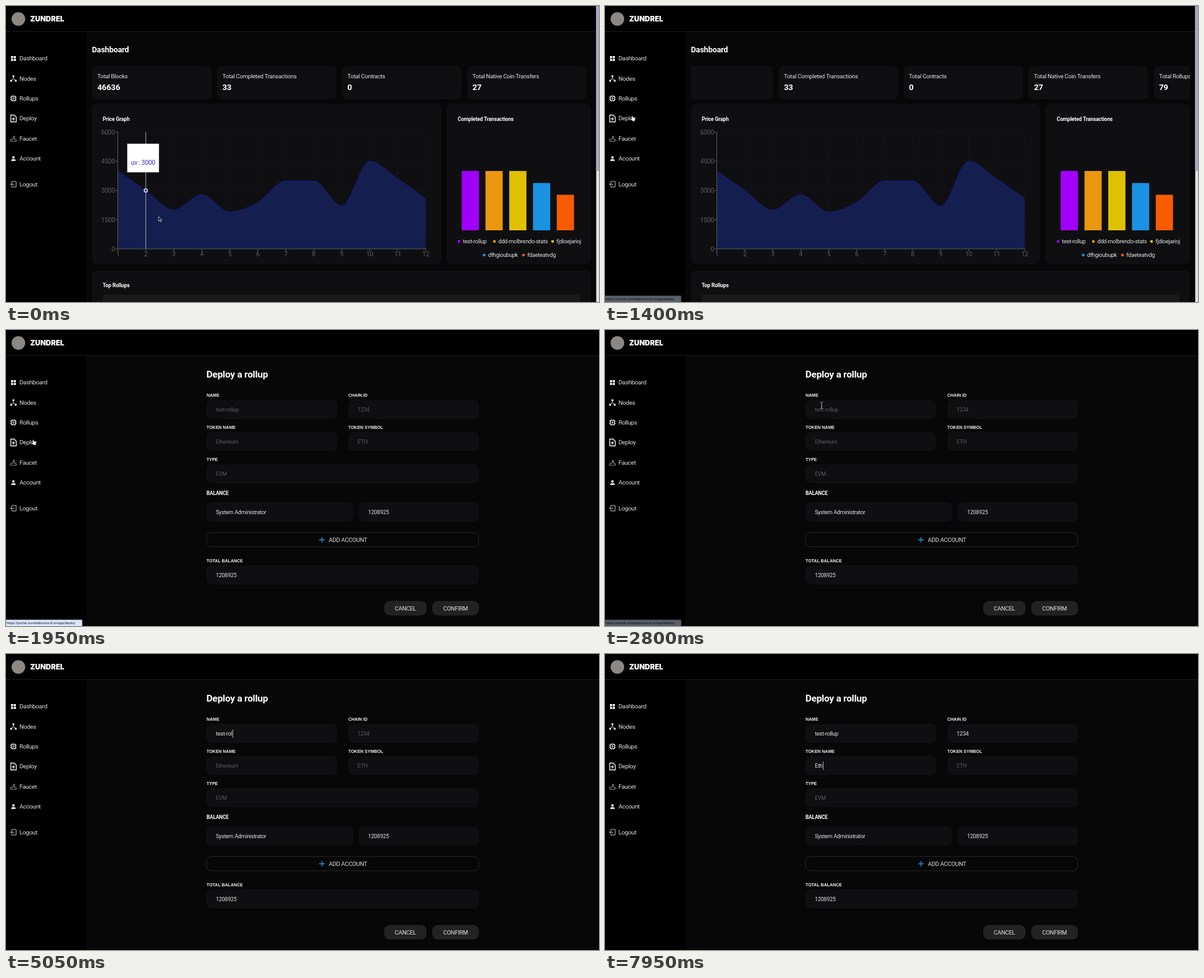
Write an HTML page that moves like this. It is 958 px wide and 479 px high and loops after 8 s.

```html
<!DOCTYPE html>
<html lang="en">
<head>
<meta charset="utf-8">
<title>Rollup dashboard</title>
<style>
html, body { margin: 0; width: 100%; height: 100%; overflow: hidden; background: #000; }
svg { display: block; width: 100%; height: 100%; }
text { font-family: Roboto, "Open Sans", sans-serif; letter-spacing: -.03em; fill: #e2e2e2; white-space: pre; }
.bold { font-weight: 700; fill: #fff; letter-spacing: -.015em; }
.label { font: 700 7px "Liberation Sans", Arial, sans-serif; letter-spacing: 0; fill: #f2f2f2; }
.brand { font: 900 11.6px Inter, sans-serif; letter-spacing: 0; fill: #fff; }
.url { font: 5.9px "Liberation Sans", Arial, sans-serif; letter-spacing: 0; fill: #1d2230; }
.axis { fill: #5c5c5e; }
.hint { fill: #57575a; }
.icon { fill: none; stroke: #f0f0f0; }
.solid { fill: #f0f0f0; stroke: none; }
</style>
</head>
<body>
<svg id="stage" viewBox="0 0 958 479" preserveAspectRatio="none"></svg>
<script>
const DURATION = 8000;
const PANEL = '#0f0f11';
const stage = document.getElementById('stage');

const text = (x, y, str, size, attrs = '') => `<text x="${x}" y="${y}" font-size="${size}" ${attrs}>${str}</text>`;
const bold = (x, y, str, size) => text(x, y, str, size, 'class="bold"');
const rect = (x, y, w, h, fill, rx = 0, attrs = '') =>
  `<rect x="${x}" y="${y}" width="${w}" height="${h}" rx="${rx}" fill="${fill}" ${attrs}/>`;
const line = (x1, y1, x2, y2, stroke, attrs = '') =>
  `<path d="M${x1} ${y1}L${x2} ${y2}" stroke="${stroke}" ${attrs}/>`;
const range = n => [...Array(n).keys()];

// Header and side menu
const menu = [
  ['Dashboard', 85, '<path class="solid" d="M-4-4h3.5v3.5h-3.5zM.5-4H4v3.5H.5zM-4 .5h3.5V4h-3.5zM.5.5H4V4H.5z"/>'],
  ['Nodes', 117.3, '<path class="icon" d="M0-3V0L-4 4M0 0L4 4"/><circle class="solid" cy="-3.7" r="1.7"/><circle class="solid" cx="-3.7" cy="3.7" r="1.7"/><circle class="solid" cx="3.7" cy="3.7" r="1.7"/>'],
  ['Rollups', 149.6, '<rect class="icon" x="-3.5" y="-3.5" width="7" height="7" rx="1.5" stroke-width="1.4"/><path class="icon" d="M-2-5V-3M2-5V-3M-2 5V3M2 5V3M-5-2H-3M-5 2H-3M5-2H3M5 2H3"/><circle class="icon" r="1.3"/>'],
  ['Deploy', 182, '<path class="icon" d="M-4.3-5.5H1.2L4.6-2V5.5H-4.3z" stroke-width="1.3"/><path class="icon" d="M0-1.8V3.2M-2.5.7H2.5" stroke-width="1.3"/>'],
  ['Faucet', 214.5, '<path class="icon" d="M-4.5 4.5V1.5H-1L-1-1H2V1.5H4.5V4.5zM-1-3.5H3M1-3.5V-1" stroke-width=".6"/>'],
  ['Account', 247, '<circle class="solid" cy="-2" r="2"/><path class="solid" d="M-3.6 3.8V2.6C-3.6.2 3.6.2 3.6 2.6V3.8z"/>'],
  ['Logout', 288.4, '<path class="icon" d="M-2.5-2V-4.5H4.3V4.5H-2.5V2M1.5 0H-4.5M-2.5-2L-4.5 0L-2.5 2" stroke-width=".8"/>']
];
const shell = rect(0, 0, 958, 479, '#070707') + rect(0, 0, 130, 479, '#000') + rect(0, 0, 958, 41, '#000') +
  rect(0, 41, 958, 1, '#1b1b1b') +
  '<circle cx="20" cy="21" r="11" fill="#8b8884"/>' +
  text(39, 25.2, 'ZUNDREL', 11.6, 'class="brand"') +
  menu.map(([name, y, icon]) =>
    `<g transform="translate(12 ${y})" stroke-width="1">${icon}</g>` + text(21.7, y + 3.4, name, 9.85)).join('');

// Area chart with a monotone cubic curve
const prices = [4000, 3000, 2000, 2780, 1890, 2390, 3490, 3490, 2200, 4500, 3600, 2580];
const STEP = 45.2;
const chartX = i => 180.7 + i * STEP;
const chartY = v => 393 - v * 189 / 6000;
const heights = prices.map(chartY);
const deltas = heights.slice(1).map((y, i) => y - heights[i]);
const inner = heights.map((_, i) => {
  const a = deltas[i - 1], b = deltas[i];
  return a * b > 0 ? Math.sign(a) * Math.min(Math.abs(a), Math.abs(b), Math.abs(a + b) / 4) * 2 : 0;
});
const last = prices.length - 1;
inner[0] = (3 * deltas[0] - inner[1]) / 2;
inner[last] = (3 * deltas[last - 1] - inner[last - 1]) / 2;
const curve = `M${chartX(0)} ${heights[0]}` + deltas.map((_, i) =>
  `C${chartX(i) + STEP / 3} ${heights[i] + inner[i] / 3} ${chartX(i + 1) - STEP / 3} ${heights[i + 1] - inner[i + 1] / 3} ${chartX(i + 1)} ${heights[i + 1]}`).join('');

const levels = range(5).map(i => i * 1500);
const priceChart = rect(139, 158, 564, 260, PANEL, 8) + bold(156.3, 186, 'Price Graph', 8.5) +
  levels.map(v => line(181, chartY(v), 678, chartY(v), '#19191b', 'stroke-dasharray="3 3"')).join('') +
  range(12).map(i => line(chartX(i), 204, chartX(i), 393, '#19191b', 'stroke-dasharray="3 3"')).join('') +
  `<path d="${curve}V393H${chartX(0)}z" fill="#141f4f"/><path d="${curve}" fill="none" stroke="#17178c" stroke-width="1"/>` +
  line(180.5, 204, 180.5, 393, '#58585a') + line(180.5, 393, 678, 393, '#58585a') +
  levels.map(v => line(176.5, chartY(v), 180.5, chartY(v), '#58585a') +
    text(176, chartY(v) + 3.8, v, 10.5, 'class="axis" text-anchor="end"')).join('') +
  range(12).map(i => line(chartX(i), 393, chartX(i), 397, '#58585a') +
    text(chartX(i), 405, i + 1, 10.3, 'class="axis" text-anchor="middle"')).join('');

const tooltip = '<g id="tooltip">' + line(225.8, 204, 225.8, 393, '#a8a8aa') +
  '<circle cx="225.8" cy="298.5" r="2.6" fill="#1d1da8" stroke="#fff" stroke-width="1.3"/>' +
  rect(196, 223, 51, 46, '#fff', 0, 'stroke="#ccc" stroke-width=".5"') +
  text(202, 257, 'uv : 3000', 10.4, 'style="fill:#3a2ec2"') + '</g>';

// Bar chart
const bars = [['#a100ff', 96], ['#eb970f', 96], ['#dfc100', 96], ['#1a93e2', 76.5], ['#f95c00', 57.5]];
const legend = [['test-rollup', 732, 381], ['ddd-molbrendo-stats', 789, 381], ['fjdioejarioj', 883, 381],
  ['dfhgioubupk', 772.5, 403], ['fdaeteatvdg', 836, 403]];
const barChart = rect(712, 158, 233, 260, PANEL, 8) + bold(729.7, 186, 'Completed Transactions', 8.5) +
  bars.map(([color, h], i) => rect(736.2 + i * 38.4, 363 - h, 27.8, h, color)).join('') +
  legend.map(([name, x, y], i) => `<circle cx="${x}" cy="${y}" r="2.3" fill="${bars[i][0]}"/>` +
    text(x + 6.3, y + 3.2, name, 9.2)).join('');

// Dashboard
const stats = [['Total Blocks', 46636], ['Total Completed Transactions', 33], ['Total Contracts', 0],
  ['Total Native Coin Transfers', 27], ['Total Rollups', 79]];
const CARD_STEP = 202;
const cards = stats.map(([name, value], i) => {
  const x = 139 + i * CARD_STEP;
  return rect(x, 97, 193, 54, PANEL, 8) + text(x + 8.5, 116.8, name, 9.6) + bold(x + 8.5, 136.3, value, 13.2);
}).join('');
const dashboard = '<g id="dashboard">' + bold(138.8, 74.6, 'Dashboard', 12.7) +
  `<g clip-path="url(#strip)"><g id="cards">${cards}</g></g>` + priceChart + tooltip + barChart +
  rect(139, 428, 806, 70, PANEL, 8) + bold(156.3, 455, 'Top Rollups', 8.5) + rect(156, 467, 772, 20, '#19191b', 4) +
  rect(953.5, 0, 4.5, 479, '#e2e2e4') + rect(953.5, 0, 4.5, 267, '#a9abc4') + '</g>';

// Form
const field = (x, y, w, content, cls = '') =>
  rect(x, y, w, 31, PANEL, 8) + text(x + 15, y + 19, content, 9, cls);
const hint = id => `class="hint" id="${id}Hint"`;
const label = (x, y, str) => text(x, y, str, 7, 'class="label"');
const button = (x, w, str) => rect(x, 438.5, w, 23.5, '#222223', 9) +
  text(x + w / 2, 453.8, str, 9.6, 'text-anchor="middle"');
const entries = {
  name: { x: 339, y: 132, keys: [...'test-rollup'], times: [3850, 4150, 4200, 4300, 4550, 4800, 4950, 5050, 5200, 5350, 5450] },
  chain: { x: 568, y: 132, keys: [...'1234'], times: [6350, 6450, 6550, 6750] },
  token: { x: 339, y: 184, keys: [...'Eth'], times: [7550, 7850, 7950] }
};
const form = '<g id="form">' + bold(323.8, 77, 'Deploy a rollup', 15.4) +
  label(324, 107.5, 'NAME') + field(324, 113, 211, 'test-rollup', hint('name')) +
  label(553, 107.5, 'CHAIN ID') + field(553, 113, 211, '1234', hint('chain')) +
  label(324, 159.5, 'TOKEN NAME') + field(324, 165, 211, 'Ethereum', hint('token')) +
  label(553, 159.5, 'TOKEN SYMBOL') + field(553, 165, 211, 'ETH', 'class="hint"') +
  label(324, 211.5, 'TYPE') + field(324, 217, 440, 'EVM', 'class="hint"') +
  bold(324, 267, 'BALANCE', 8.2) + field(324, 279, 237, 'System Administrator') + field(570, 279, 194, '1208925') +
  rect(324, 327.7, 439.7, 23.2, 'none', 8, 'stroke="#343436" stroke-width=".7"') +
  '<path d="M506 339.5H515M510.5 335V344" stroke="#2c8fe0" stroke-width="1.3"/>' +
  text(521.5, 342.8, 'ADD ACCOUNT', 9.6) +
  label(324, 375.5, 'TOTAL BALANCE') + field(324, 381, 440, '1208925') +
  button(611, 68.5, 'CANCEL') + button(688.5, 75.5, 'CONFIRM') +
  Object.entries(entries).map(([id, e]) => text(e.x, e.y, '', 9.15, `id="${id}"`)).join('') +
  rect(0, 0, .8, 13.5, '#d0d0d0', 0, 'id="caret"') + '</g>';

const status = '<g id="status">' + rect(-1, 469, 124, 11, '#dce6fa', 1, 'stroke="#8f9bb0" stroke-width=".7"') +
  text(1, 476.3, 'https://portal.zundrelprotocol.io/app/deploy', 5.9, 'class="url"') + '</g>';

const pointer = '<g id="pointer">' +
  '<path id="arrow" d="M0 0V7.2L1.7 5.7L2.8 8.3L4 7.8L2.9 5.3H5.1z" fill="#000" stroke="#fff" stroke-width=".7"/>' +
  '<path id="hand" d="M-1 0Q0-1 .6 0L1.3 2L4 2.7Q5 3 4.8 4.5L4 8H.2L-2.4 4.8Q-2.3 3.6-.6 4.5z" fill="#fff" stroke="#111" stroke-width=".5"/>' +
  '<path id="beam" d="M-2-5Q0-5 0-4Q0-5 2-5M0-4V4M-2 5Q0 5 0 4Q0 5 2 5M-1 1H1" fill="none" stroke="#b4b4b4" stroke-width=".9"/></g>';

stage.innerHTML = '<clipPath id="strip"><rect x="139" y="90" width="806" height="66"/></clipPath>' +
  shell + dashboard + form + status + pointer;

const ui = Object.fromEntries([...stage.querySelectorAll('[id]')].map(el => [el.id, el]));
const show = (el, on) => el.setAttribute('display', on ? 'inline' : 'none');
const clamp = v => Math.max(0, Math.min(1, v));
const ramp = (t, from, to) => clamp((t - from) / (to - from));

// Equivalent of the CSS "ease" curve
function ease(x) {
  const bezier = (a, b, u) => 3 * a * u * (1 - u) ** 2 + 3 * b * u * u * (1 - u) + u ** 3;
  let low = 0, high = 1;
  for (let i = 0; i < 20; i++) {
    const mid = (low + high) / 2;
    if (bezier(.25, .25, mid) < x) low = mid; else high = mid;
  }
  return bezier(.1, 1, low);
}

const track = [[0, 247, 341], [50, 232, 331], [200, 130, 272], [400, 65.5, 232.5], [850, 53, 198], [1150, 44, 178],
  [2350, 44, 178], [2550, 205, 146], [2700, 325, 126], [2800, 350, 122], [8000, 350, 122]];
function pointerAt(t) {
  const i = track.findIndex(k => k[0] > t);
  const [t0, x0, y0] = track[i - 1], [t1, x1, y1] = track[i];
  const p = (t - t0) / (t1 - t0);
  return [x0 + (x1 - x0) * p, y0 + (y1 - y0) * p];
}

function drawEntries(t) {
  for (const [id, e] of Object.entries(entries)) {
    const count = e.times.filter(at => at <= t).length;
    ui[id].textContent = e.keys.slice(0, count).join('');
    show(ui[id + 'Hint'], count === 0);
  }
  const focus = t >= 6950 ? 'token' : t >= 5600 ? 'chain' : 'name';
  const { x, y, times } = entries[focus];
  const start = { name: 3050, chain: 5600, token: 7000 }[focus];
  const active = Math.max(start, ...times.filter(at => at <= t));
  show(ui.caret, t >= start && (t - active) % 1000 < 500);
  const width = ui[focus].textContent ? ui[focus].getComputedTextLength() : 0;
  ui.caret.setAttribute('x', Math.round(x + width + .4));
  ui.caret.setAttribute('y', y - 10);
}

function render(t) {
  const onForm = t >= 1950;
  show(ui.dashboard, !onForm);
  show(ui.form, onForm);
  const [x, y] = pointerAt(t);
  show(ui.tooltip, x > 203);
  ui.cards.setAttribute('transform', `translate(${-CARD_STEP * ease(ramp(t, 1300, 1800))} 0)`);
  ui.status.setAttribute('opacity', ramp(t, 1300, 1540) * (1 - ramp(t, 2660, 2900)));

  const overLink = t >= 1100 && t < 2400;
  const overField = x > 324;
  ui.pointer.setAttribute('transform', `translate(${x} ${y})`);
  show(ui.pointer, t < 3850);
  show(ui.hand, overLink);
  show(ui.beam, onForm && overField);
  show(ui.arrow, !overLink && !(onForm && overField));
  if (onForm) drawEntries(t);
}

function tick() {
  render(performance.now() % DURATION);
  requestAnimationFrame(tick);
}
tick();
</script>
</body>
</html>
```
